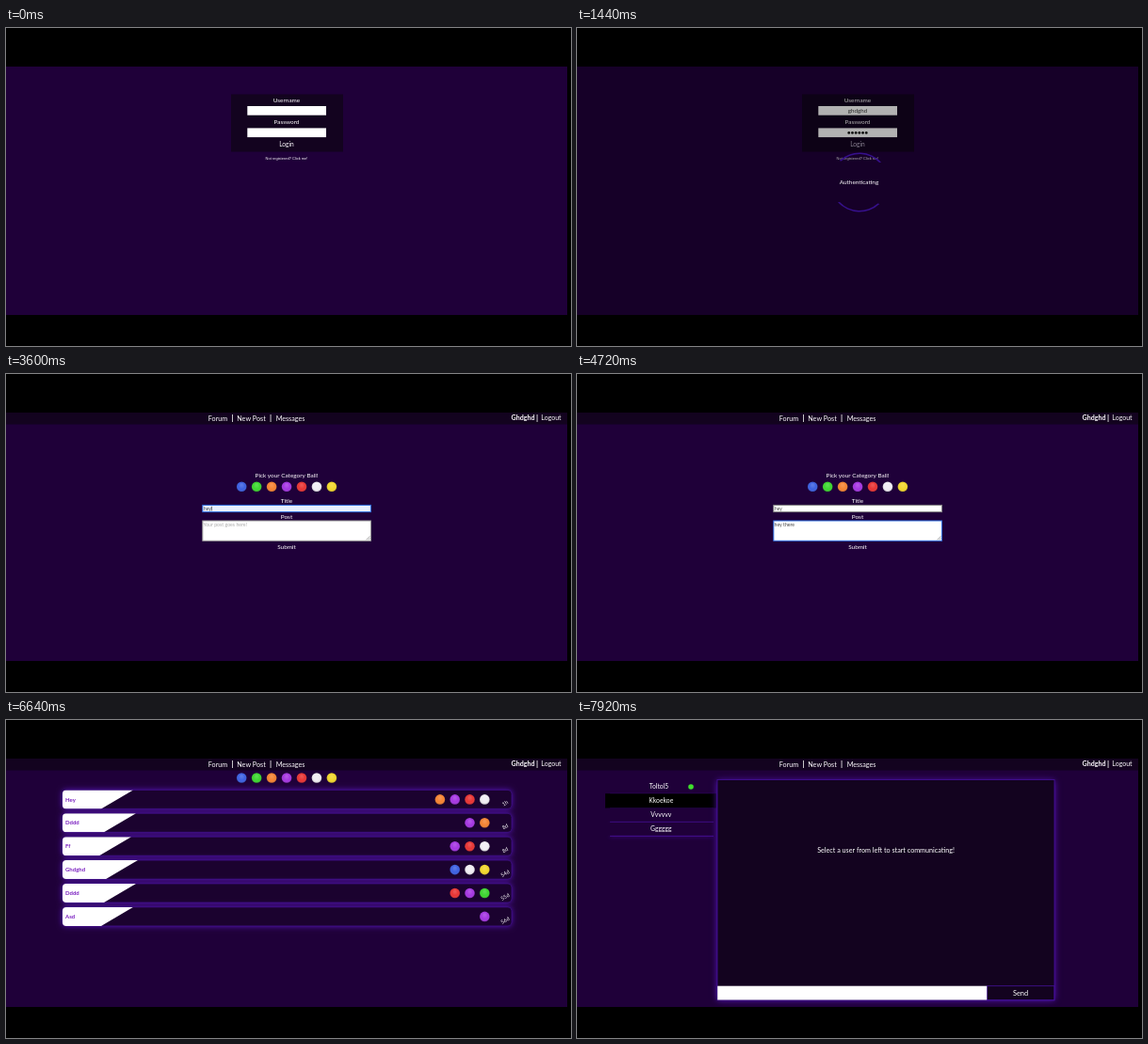
Recreate the animation shown at these times as an HTML page with a canvas. Size 600 by 338 pixels, loop 8 s.

```html
<!DOCTYPE html>
<html lang="en">
<head>
<meta charset="utf-8">
<title>Forum walkthrough</title>
<style>
  html, body { margin: 0; width: 100%; height: 100%; overflow: hidden; background: #000; }
  canvas { display: block; width: 600px; height: 338px; }
</style>
</head>
<body>
<canvas id="stage" width="600" height="338"></canvas>
<script>
const ctx = document.getElementById('stage').getContext('2d');
const LOOP = 8000;
const USER = 'Ghdghd';
const PAGE = '#1f0039', PANEL = '#13031f', ROW = '#1b022f', GLOW = '#5a16c4', DIM = '#c2b9cf';
const BALLS = {
  blue: '#3c60e2', green: '#3cd62f', orange: '#f58332', purple: '#a536e2',
  red: '#e83434', white: '#f0edf4', yellow: '#f2d72c'
};
// title, top-right end of the white wedge, balls from left to right, age
const POSTS = [
  ['Hey', 135, ['orange', 'purple', 'red', 'white'], '1h'],
  ['Dddd', 138, ['purple', 'orange'], '8d'],
  ['Ff', 133, ['purple', 'red', 'white'], '8d'],
  [USER, 140, ['blue', 'white', 'yellow'], '54d'],
  ['Dddd', 138, ['red', 'purple', 'green'], '55d'],
  ['Asd', 135, ['purple'], '56d']
];

function rect(x, y, w, h, color) {
  ctx.fillStyle = color;
  ctx.fillRect(x, y, w, h);
}

// y is the middle of the capitals
function text(str, x, y, size = 6.4, { align = 'center', color = '#fff', weight = 400, font = 'Lato, sans-serif' } = {}) {
  ctx.font = `${weight} ${size}px ${font}`;
  ctx.textAlign = align;
  ctx.fillStyle = color;
  ctx.fillText(str, x, y + size * 0.35);
}

function disc(x, y, r, color) {
  ctx.fillStyle = color;
  ctx.beginPath();
  ctx.arc(x, y, r, 0, Math.PI * 2);
  ctx.fill();
}

function withGlow(blur, draw) {
  ctx.save();
  ctx.shadowColor = GLOW;
  ctx.shadowBlur = blur;
  draw();
  ctx.restore();
}

function ball(name, x, y) {
  disc(x, y, 5.3, BALLS[name]);
  const shade = ctx.createRadialGradient(x, y - 2, 1, x, y, 5.3);
  shade.addColorStop(0, 'rgba(255,255,255,.15)');
  shade.addColorStop(0.6, 'rgba(255,255,255,0)');
  shade.addColorStop(1, 'rgba(0,0,0,.2)');
  disc(x, y, 5.3, shade);
}

function ballBar(y) {
  Object.keys(BALLS).forEach((name, i) => ball(name, 250.2 + i * 15.95, y));
}

const typed = (str, t, start, step) =>
  str.slice(0, Math.max(0, Math.floor((t - start) / step) + 1));

function header(hovered) {
  rect(0, 41, 596, 12.5, PANEL);
  [['Forum', 225], ['New Post', 260.5], ['Messages', 302]].forEach(([label, x]) =>
    text(label, x, 47, 7.2, { color: label === hovered ? DIM : '#fff' }));
  text(USER, 561.5, 47, 7.1, { align: 'right', weight: 700 });
  text('Logout', 579, 47, 7);
  [240.5, 281, 564].forEach(x => rect(x - 0.4, 43, 0.9, 8, '#ddd'));
}

function login(t) {
  rect(239, 70.5, 119, 61, PANEL);
  text('Username', 298, 76.5);
  rect(256.3, 83, 83.7, 9.7, '#fff');
  text(typed('ghdghd', t, 480, 60), 298, 88, 6.2, { color: '#333' });
  text('Password', 298, 99.7);
  rect(256.3, 106.4, 83.7, 9.7, '#fff');
  const count = typed('******', t, 880, 60).length;
  for (let i = 0; i < count; i++) disc(298 + (i - (count - 1) / 2) * 3.7, 111.4, 1.4, '#111');
  text('Login', 298, 124, 6.6, { color: t >= 1280 ? DIM : '#fff' });
  text('Not registered? Click me!', 298, 139, 4, { font: '"Liberation Sans", sans-serif' });
}

function post([title, wedge, balls, age], top) {
  ctx.beginPath();
  ctx.roundRect(60, top, 477, 20, 4);
  withGlow(6, () => { ctx.fillStyle = ROW; ctx.fill(); });
  ctx.strokeStyle = '#40108a';
  ctx.lineWidth = 0.7;
  ctx.stroke();

  ctx.save();
  ctx.clip();
  ctx.fillStyle = '#fff';
  ctx.beginPath();
  ctx.moveTo(60, top);
  ctx.lineTo(wedge, top);
  ctx.lineTo(wedge - 34, top + 20);
  ctx.lineTo(60, top + 20);
  ctx.fill();
  ctx.restore();

  text(title, 63, top + 10, 6, { align: 'left', color: '#7a1fc0', weight: 700 });
  balls.forEach((name, i) => ball(name, 508.3 - (balls.length - 1 - i) * 15.8, top + 10));
  ctx.save();
  ctx.translate(530, top + 14);
  ctx.rotate(-Math.PI / 6);
  text(age, 0, 0, 5.6);
  ctx.restore();
}

function forum(posts, hovered) {
  header(hovered);
  ballBar(61.5);
  posts.forEach((p, i) => post(p, 74.4 + i * 24.9));
}

function loader(label, degrees) {
  rect(0, 41, 596, 264, 'rgba(0,0,0,.3)');
  text(label, 299.5, 163.8);
  ctx.save();
  ctx.translate(300, 164);
  ctx.rotate(degrees * Math.PI / 180);
  // crescents that thin out towards both ends
  ctx.fillStyle = '#36108c';
  for (const side of [-1, 1]) {
    const mid = side * Math.PI / 2;
    ctx.beginPath();
    ctx.arc(0, 0, 31.4, mid - Math.PI / 4, mid + Math.PI / 4);
    ctx.arc(0, side * 0.8, 29.2, mid + Math.PI / 4.1, mid - Math.PI / 4.1, true);
    ctx.fill();
  }
  ctx.restore();
}

function field(x, y, w, h, fill, border) {
  rect(x, y, w, h, fill);
  ctx.strokeStyle = border;
  ctx.lineWidth = 1;
  ctx.strokeRect(x, y, w, h);
}

function newPost(t) {
  header(t < 3040 ? 'New Post' : '');
  text('Pick your Category Ball!', 298, 107.5);
  ballBar(119.8);

  const inTitle = t >= 3120 && t < 3840;
  const title = typed('hey', t, 3280, 100);
  text('Title', 298, 135);
  field(208.8, 139.4, 178.6, 7.2, inTitle ? '#e8f0fe' : '#fff', inTitle ? '#2f6fe0' : '#888');
  text(title, 210, 143, 4.8, { align: 'left', color: '#444' });
  if (inTitle) rect(210.3 + ctx.measureText(title).width, 140.8, 0.6, 4.6, '#111');

  const inBody = t >= 3920;
  const body = typed('hey there', t, 3920, 80);
  text('Post', 298, 151.7);
  field(208.8, 156, 178.6, 21.3, '#fff', inBody ? '#2f6fe0' : '#999');
  text(body || 'Your post goes here!', 209.5, 160.3, 5.2, { align: 'left', color: body ? '#444' : '#aaa' });
  ctx.strokeStyle = '#777';
  ctx.lineWidth = 0.6;
  ctx.beginPath();
  for (const d of [2, 4]) {
    ctx.moveTo(386.5 - d, 176.3);
    ctx.lineTo(386.5, 176.3 - d);
  }
  ctx.stroke();
  text('Submit', 298, 184, 6.4, { color: t >= 4800 ? DIM : '#fff' });
}

function messages(t) {
  header(t < 7680 ? 'Messages' : '');
  ['Toltol5', 'Kkoekoe', 'Vvvvvv', 'Gggggg'].forEach((name, i) => {
    const y = 71 + i * 15;
    withGlow(4, () => rect(35, y + 6.8, 110, 0.9, '#48109c'));
    rect(31, y - 7.2, 117, 13.8, PAGE);
    if (i === 1 && t >= 7760) rect(30, y - 7.8, 118, 15.4, '#000');
    text(name, i ? 89.3 : 87, y, 6.8);
  });
  disc(121, 71, 2.8, '#3fe02c');

  withGlow(7, () => rect(149, 63.5, 358, 234.3, PANEL));
  ctx.strokeStyle = '#44119a';
  ctx.lineWidth = 0.8;
  ctx.strokeRect(149, 63.5, 358, 234.3);
  ctx.strokeRect(435.5, 282.7, 71.5, 15.1);
  rect(149.2, 282.7, 286, 14.8, '#fff');
  text('Select a user from left to start communicating!', 328, 138, 7.2);
  text('Send', 471, 290.5, 7.4);
}

function render(t) {
  rect(0, 0, 600, 338, '#000');
  rect(0, 41, 596, 264, PAGE);
  ctx.save();
  ctx.beginPath();
  ctx.rect(0, 41, 596, 264);
  ctx.clip();
  const oldPosts = POSTS.slice(1);
  if (t < 1760) {
    login(t);
    if (t >= 1360) loader('Authenticating', 2 + (t - 1440) * 0.18);
  } else if (t < 2160) {
    forum([]);
    loader('Fetching posts', 10.5 + (t - 1840) * 0.18);
  } else if (t < 2720) {
    forum(oldPosts, t >= 2400 ? 'New Post' : '');
  } else if (t < 5200) {
    newPost(t);
  } else if (t < 5520) {
    forum([]);
    loader('Fetching posts', 10.5 + (t - 5280) * 0.18);
  } else if (t < 7520) {
    forum(POSTS, t >= 7200 ? 'Messages' : '');
  } else {
    messages(t);
  }
  ctx.restore();
}

const start = performance.now();
function tick() {
  render((performance.now() - start) % LOOP);
  requestAnimationFrame(tick);
}
tick();
</script>
</body>
</html>
```
